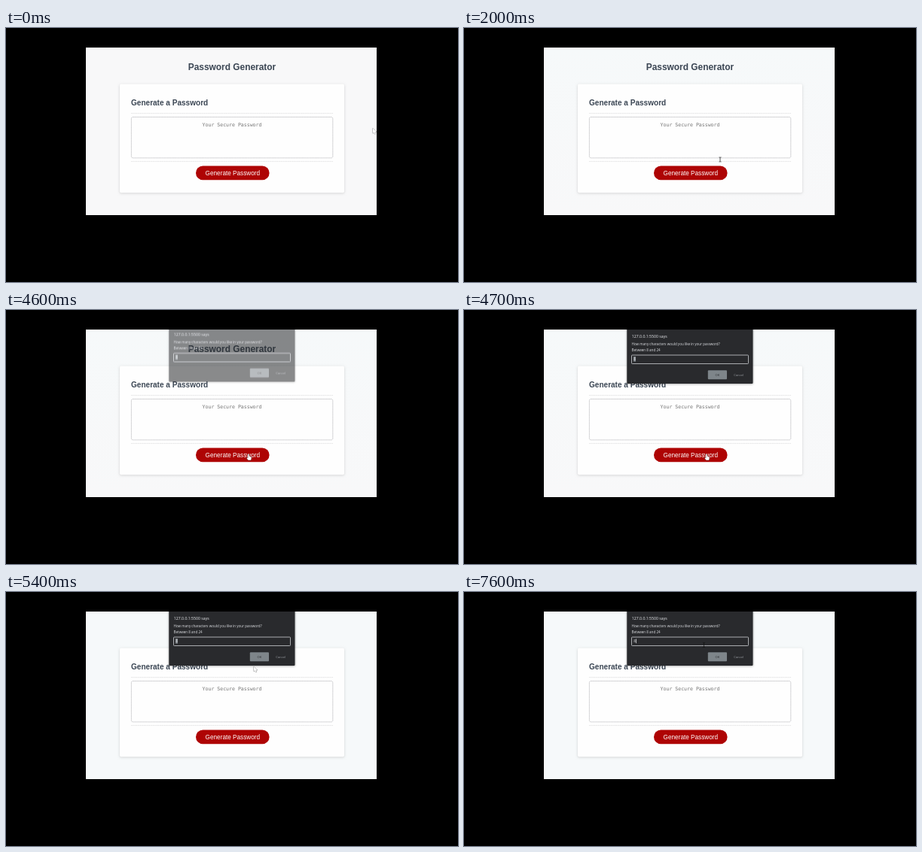
An HTML page with a canvas for the animation above (8000 ms loop, 600x338 px).

```html
<!DOCTYPE html>
<html lang="en">
<head>
<meta charset="utf-8">
<title>Password Generator</title>
<style>
html, body { margin: 0; width: 100%; height: 100%; overflow: hidden; background: #000; }
canvas { display: block; width: 600px; height: 338px; }
</style>
</head>
<body>
<canvas id="stage" width="600" height="338"></canvas>
<script>
const ctx = document.getElementById('stage').getContext('2d');
const LOOP = 8000;
const ARIAL = '"Liberation Sans", Arial, sans-serif';
const UI = '"Open Sans", "Noto Sans", sans-serif';
const MONO = '"DejaVu Sans Mono", monospace';
const SLATE = '#3b4654';

// Pointer steps: start time, shape, hot spot
const pointer = [
  [0, 'arrow', 487, 133.6],
  [1000, 'none', 0, 0],
  [1500, 'arrow', 487, 139.5],
  [1600, 'arrow', 464, 146],
  [1700, 'arrow', 439.5, 150],
  [1900, 'beam', 412, 143],
  [2000, 'beam', 340, 175],
  [2100, 'hand', 312, 187],
  [2200, 'hand', 301.5, 189],
  [2500, 'hand', 306, 189.5],
  [2600, 'hand', 322, 191],
  [2700, 'hand', 329, 192],
  [2800, 'hand', 322, 191.8],
  [5000, 'hand', 322, 187],
  [5100, 'arrow', 323, 168],
  [5200, 'arrow', 325, 140],
  [5300, 'arrow', 327, 115],
  [5400, 'arrow', 329, 99],
  [5600, 'arrow', 330, 96],
  [5700, 'arrow', 326, 88],
  [5800, 'arrow', 319, 79],
  [5900, 'beam', 317, 74],
  [6000, 'beam', 320, 71],
  [6800, 'beam', 319, 70.5],
  [6900, 'beam', 318.5, 70.5]
];

function text(str, x, y, font, color, align = 'left') {
  ctx.font = font;
  ctx.fillStyle = color;
  ctx.textAlign = align;
  ctx.fillText(str, x, y);
}

function box(x, y, w, h, r, fill, stroke) {
  ctx.beginPath();
  ctx.roundRect(x, y, w, h, r);
  if (fill) { ctx.fillStyle = fill; ctx.fill(); }
  if (stroke) { ctx.strokeStyle = stroke; ctx.stroke(); }
}

function shadow(color, blur, dy) {
  ctx.shadowColor = color;
  ctx.shadowBlur = blur;
  ctx.shadowOffsetY = dy;
}

function rule(y) {
  ctx.beginPath();
  ctx.moveTo(166, y);
  ctx.lineTo(434, y);
  ctx.strokeStyle = '#dcdcde';
  ctx.stroke();
}

function page(t) {
  const bg = ctx.createLinearGradient(0, 26, 0, 249);
  bg.addColorStop(0, t < 100 ? '#f8f8f9' : '#f6f9fa');
  bg.addColorStop(1, t < 5200 ? '#f8f8f9' : '#f6f9fa');
  ctx.fillStyle = bg;
  ctx.fillRect(106, 26, 386, 223);
  text('Password Generator', 300, 56.3, 'bold 11.92px ' + ARIAL, SLATE, 'center');

  ctx.save();
  shadow('rgba(0,0,0,.16)', 3.5, 0.8);
  box(151, 74.6, 298, 144.6, 1.8, '#fefefe');
  ctx.restore();

  text('Generate a Password', 166, 103.2, 'bold 10.06px ' + ARIAL, SLATE);
  ctx.save();
  ctx.lineWidth = 0.8;
  ctx.setLineDash([1.2, 0.5]);
  rule(113.6);
  rule(177.6);
  ctx.setLineDash([1.4, 0.5]);
  box(166.4, 118.5, 267.4, 54.4, 2, null, '#b8b8bb');
  ctx.restore();
  text('Your Secure Password', 300, 130.8, '6.56px ' + MONO, '#757575', 'center');

  box(252, 183.6, 97.6, 18.6, 9.3, '#ae0404');
  text('Generate Password', 300.8, 195.8, '8.2px ' + ARIAL, '#fff', 'center');
}

function field(t) {
  ctx.lineWidth = 0.9;
  box(222.5, 60, 155, 11.5, 0.8, '#292a2d', '#b9bcc0');
  if (t < 6400) {
    ctx.fillStyle = '#80868b';
    ctx.fillRect(225, 62, 3, 6.6);
  }
  text('8', 225.2, 67.2, '4.6px ' + UI, '#e8eaed');
  const caret = t >= 6400 && t < 6900 || t >= 7600;
  if (caret) {
    ctx.fillStyle = '#e8eaed';
    ctx.fillRect(228, 62.4, 0.7, 5.8);
  }
}

function dialogBody(t) {
  ctx.save();
  shadow('rgba(0,0,0,.4)', 3, 0.6);
  box(216.3, 20, 167.2, 78, 1.2, '#292a2d');
  ctx.restore();
  text('127.0.0.1:5500 says', 222.8, 37, '5.2px ' + UI, '#e8eaed');
  text('How many characters would you like in your password?', 222.6, 47.4, '4.56px ' + UI, '#dfe1e5');
  text('Between 8 and 24', 222.6, 55, '4.56px ' + UI, '#dfe1e5');
  field(t);
  box(323.8, 80.3, 25.2, 12, 1, '#7e858a');
  text('OK', 336.4, 87.9, '4.1px ' + UI, '#2c2e31', 'center');
  text('Cancel', 364.6, 87.9, '4.2px ' + UI, '#969a9f', 'center');
}

// Separate layer so the fading dialog blends as one piece
const stage = ctx.canvas;
const layer = document.createElement('canvas');
layer.width = 600;
layer.height = 338;
const layerCtx = layer.getContext('2d');

function dialog(t) {
  if (t < 4600) return;
  const opening = t < 4700;
  draw2(() => dialogBody(t));
  ctx.save();
  ctx.globalAlpha = opening ? 0.55 : 1;
  ctx.drawImage(layer, 0, opening ? -2.5 : 0);
  ctx.restore();
}

function draw2(paint) {
  layerCtx.clearRect(0, 0, 600, 338);
  const own = ['fillStyle', 'strokeStyle', 'font', 'textAlign', 'lineWidth',
    'shadowColor', 'shadowBlur', 'shadowOffsetY'];
  const proxy = { save: ctx.save, restore: ctx.restore, fillText: ctx.fillText,
    beginPath: ctx.beginPath, roundRect: ctx.roundRect, fill: ctx.fill,
    stroke: ctx.stroke, fillRect: ctx.fillRect };
  for (const name in proxy) ctx[name] = (...args) => layerCtx[name](...args);
  for (const name of own) {
    Object.defineProperty(ctx, name, {
      configurable: true,
      get: () => layerCtx[name],
      set: v => { layerCtx[name] = v; }
    });
  }
  paint();
  for (const name in proxy) delete ctx[name];
  for (const name of own) delete ctx[name];
}

const arrow = new Path2D('M0 0V6.6L1.6 5.2L2.7 7.6L3.8 7.1L2.8 4.8H4.8Z');
const hand = new Path2D('M-.7 .6Q0 -.5 .7 .6V3L3.3 3.7Q4 4 3.8 5L3.2 8H-.6L-2.4 5.4Q-2.5 4.3 -1.4 4.7L-.7 5.3Z');
const beam = new Path2D('M-1.5 -3Q-.3 -3 0 -2.5Q.3 -3 1.5 -3M0 -2.5V2.5M-1.5 3Q-.3 3 0 2.5Q.3 3 1.5 3');

function cursor(t) {
  const [, shape, x, y] = pointer.findLast(step => step[0] <= t);
  if (shape === 'none') return;
  ctx.save();
  ctx.translate(x, y);
  ctx.lineWidth = 0.7;
  if (shape === 'beam') {
    ctx.strokeStyle = '#111';
    ctx.stroke(beam);
  } else {
    const path = shape === 'hand' ? hand : arrow;
    ctx.fillStyle = '#fff';
    ctx.strokeStyle = shape === 'hand' ? '#222' : '#666';
    ctx.stroke(path);
    ctx.fill(path);
  }
  ctx.restore();
}

function frame(now) {
  const t = now % LOOP;
  ctx.fillStyle = '#000';
  ctx.fillRect(0, 0, stage.width, stage.height);
  ctx.save();
  ctx.beginPath();
  ctx.rect(106, 26, 386, 223);
  ctx.clip();
  page(t);
  dialog(t);
  cursor(t);
  ctx.restore();
  requestAnimationFrame(frame);
}

const start = performance.now();
requestAnimationFrame(function first() {
  frame(Math.max(0, performance.now() - start));
});
</script>
</body>
</html>
```
